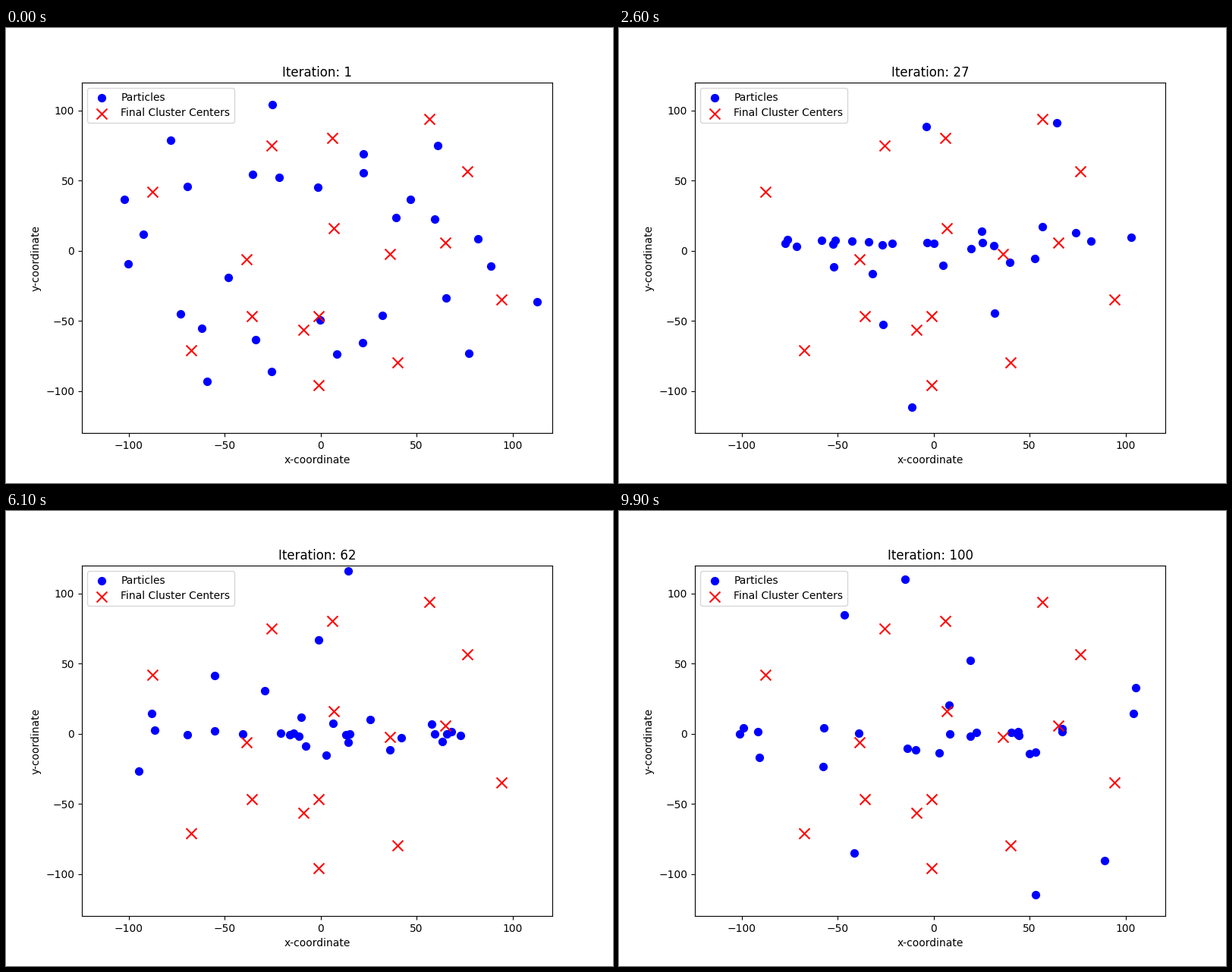
These frames come from a looping animation (800x600 px, 10 s). A matplotlib script:

```python
import numpy as np
import matplotlib.pyplot as plt
from matplotlib.animation import FuncAnimation

FRAMES, COUNT = 100, 30
XLIM, YLIM = (-124.34, 120.66), (-130, 120)
LEFT, RIGHT, TOP, BOTTOM = 100, 720, 72, 534  # axes box in pixels
REACH = 124

rng = np.random.default_rng(7)


def to_data(points):
    """Convert (x, y) pixel pairs to axis coordinates."""
    x, y = np.array(points, float).T + 0.2
    return np.column_stack([
        np.interp(x, (LEFT, RIGHT), XLIM),
        np.interp(y, (TOP, BOTTOM), YLIM[::-1]),
    ])


def ring():
    """Starting swarm: dots spread around an empty middle."""
    angle = 2 * np.pi * (np.arange(COUNT) + rng.uniform(0, 0.8, COUNT)) / COUNT
    radius = rng.uniform(45, 120, COUNT)
    return np.column_stack([radius * np.cos(angle), radius * np.sin(angle)])


def band(step):
    """Dots crowded around a drifting x and a nearly level y, with far strays."""
    middle = np.interp(step, (0, 20, 42, 65, 99), (0, 0, -40, 25, 40))
    level = np.interp(step, (0, 45, 60, 99), (3, 6, 0, 1))
    x = rng.triangular(-REACH, middle, 116, COUNT)
    stray = 14 * rng.normal(0, 1, COUNT) ** 3
    return np.column_stack([x, level + 118 * np.tanh(stray / 118)])


def wander():
    """Each step some dots jump to a fresh place and the rest shiver."""
    dots = ring()
    path = [dots]
    for step in range(1, FRAMES):
        jump = rng.random((COUNT, 1)) < 0.35
        shiver = dots + rng.normal(0, (2, 0.5), dots.shape)
        dots = np.where(jump, band(step), shiver)
        dots = np.clip(dots, -REACH, (116, 118))
        path.append(dots)
    return path


centers = to_data([
    (350, 155), (430, 145), (558, 120), (608, 189), (193, 216), (432, 264),
    (506, 298), (579, 283), (317, 305), (324, 380), (412, 380), (392, 398),
    (244, 425), (653, 358), (516, 441), (412, 471)])
path = wander()

fig, ax = plt.subplots(figsize=(8, 6), dpi=100)
particles = ax.scatter(*path[0].T, s=50, c="blue", label="Particles")
ax.scatter(*centers.T, s=100, c="red", marker="x",
           label="Final Cluster Centers")
ax.set(xlim=XLIM, ylim=YLIM, xlabel="x-coordinate", ylabel="y-coordinate")
ax.legend(loc="upper left")
title = ax.set_title("Iteration: 1")


def update(step):
    particles.set_offsets(path[step])
    title.set_text(f"Iteration: {step + 1}")
    return particles, title


anim = FuncAnimation(fig, update, frames=FRAMES, interval=100,
                     repeat=True, repeat_delay=0)
plt.show()
```
